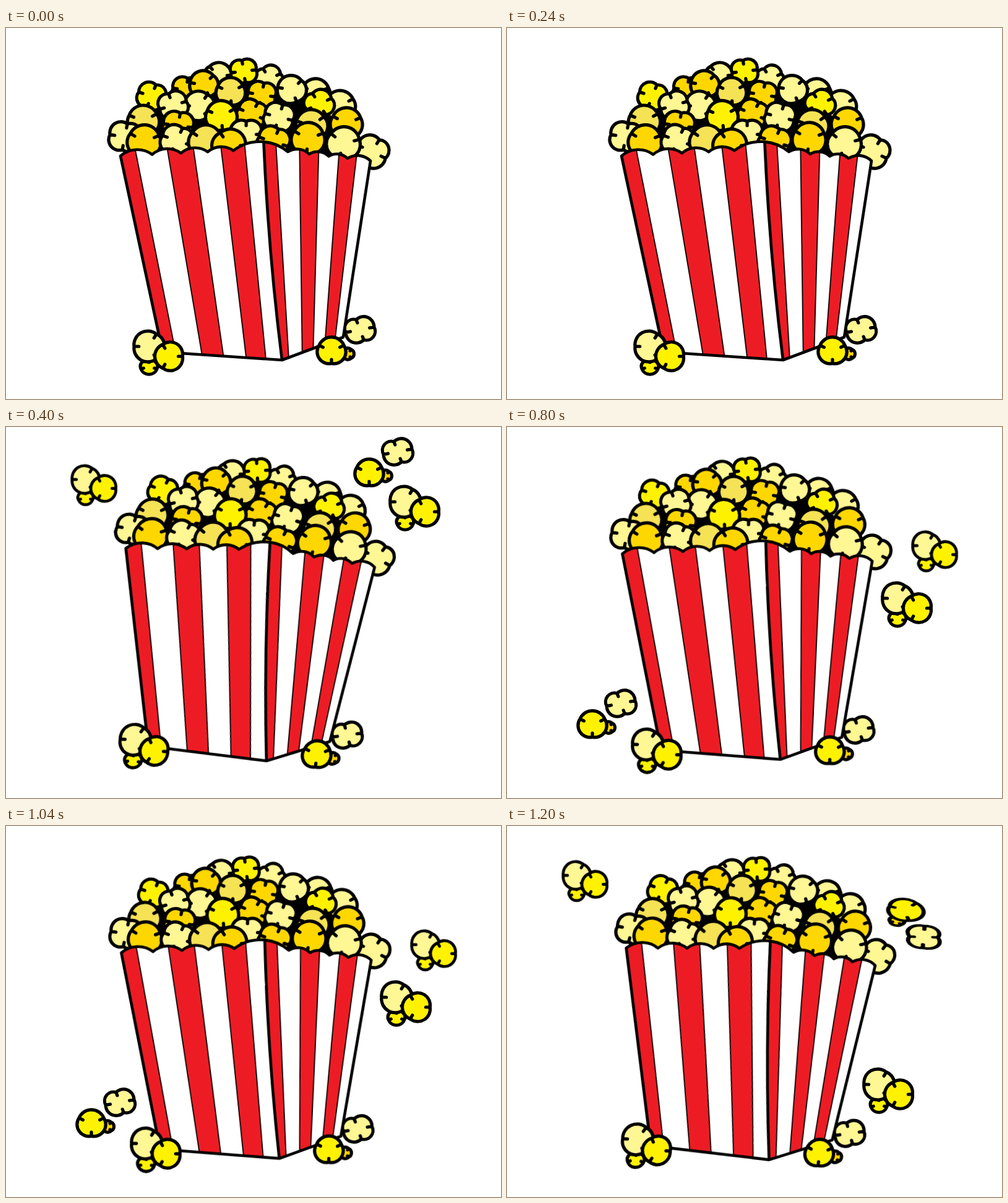
An HTML page that plays this animation: 800x600 px, repeating every 1.6 s.

```html
<!DOCTYPE html>
<html lang="en">
<head>
<meta charset="utf-8">
<title>Popcorn</title>
<style>
  html, body { margin: 0; width: 100%; height: 100%; overflow: hidden; background: #fff; }
  svg { display: block; width: 100%; height: 100%; }
  path { stroke: #000; stroke-linejoin: round; stroke-linecap: round; }
  .puff { stroke-width: 5.2; }
  .stripe { fill: #ed1c24; stroke-width: 1.8; }
  .fold, .rim { fill: none; stroke-width: 4.6; }

  .move { animation: 1.6s step-end infinite; }
  #box { transform-origin: 380px 288px; animation-name: sway; }
  #big, #small { transform-origin: 246px 524px; }
  #big { animation-name: big; }
  #small { animation-name: small; }
  #pair { transform-origin: 552px 505px; animation-name: pair; }

  /* Turns happen in a square picture that is widened to 4:3. */
  @keyframes sway {
    0%, 100% { transform: scale(1.3333, 1) rotate(0deg) scale(.75, 1); }
    25% { transform: scale(1.3333, 1) rotate(4.3deg) scale(.75, 1); }
    50% { transform: scale(1.3333, 1) rotate(.75deg) scale(.75, 1); }
    75% { transform: scale(1.3333, 1) rotate(3.85deg) scale(.75, 1); }
  }
  @keyframes big {
    0%, 100% { visibility: hidden; }
    25% { visibility: visible; transform: translate(414px, -394px); }
    50% { visibility: visible; transform: translate(400px, -238px); }
    75% { visibility: visible; transform: translate(370px, -97px); }
  }
  @keyframes small {
    0%, 100% { visibility: hidden; }
    25% { visibility: visible; transform: translate(-104px, -431px) scale(.9); }
    50% { visibility: visible; transform: translate(445px, -324px) scale(.9); }
    75% { visibility: visible; transform: translate(-120px, -436px) scale(.9); }
  }
  @keyframes pair {
    0%, 100% { visibility: hidden; }
    25% { visibility: visible; transform: translate(61px, -448px); }
    50% { visibility: visible; transform: translate(-388px, -41px); }
    75% { visibility: visible; transform: translate(106px, -345px) scale(1.3333, 1) rotate(108deg) scale(.75, 1); }
  }
</style>
</head>
<body>
<svg viewBox="0 0 800 600" preserveAspectRatio="none">
  <defs>
    <clipPath id="tubClip"><path id="tubShape"/></clipPath>
    <g id="cross"></g>
    <g id="kernel"></g>
    <g id="trio"></g>
  </defs>
  <g id="box" class="move">
    <use href="#cross"/>
    <path d="M200 200 230 115 380 80 545 125 580 205Z"/>
    <g id="pile"></g>
    <g id="tub" clip-path="url(#tubClip)"><path fill="#fff" d="M0 0H800V600H0Z"/></g>
    <g id="rim"></g>
    <use href="#trio"/>
    <use href="#kernel"/>
  </g>
  <g id="big" class="move"><use href="#trio"/></g>
  <g id="small" class="move"><use href="#trio"/></g>
  <g id="pair" class="move"><use href="#cross"/><use href="#kernel"/></g>
</svg>
<script>
const COLORS = { P: '#fff694', G: '#ffd700', B: '#fff200', D: '#f5e255' };
const find = id => document.getElementById(id);
const random = seed => Math.abs(Math.sin(seed * 12.9898) * 43758.5453) % 1;
const mix = (a, b, t) => a + (b - a) * t;
const mixPoint = (p, q, t) => [mix(p[0], q[0], t), mix(p[1], q[1], t)];

function addPath(parent, className, d, fill = '') {
  const path = document.createElementNS('http://www.w3.org/2000/svg', 'path');
  path.setAttribute('class', className);
  path.setAttribute('d', d);
  if (fill) path.setAttribute('fill', fill);
  find(parent).append(path);
}

// Round bulge from p to q; k is its radius in chords.
function bulge(p, q, k) {
  const r = k * Math.hypot(q[0] - p[0], q[1] - p[1]);
  return `A${r} ${r} 0 0 1 ${q}`;
}

// A puffed kernel: equal lobes around an ellipse, with a short crease at each notch.
function puff(parent, color, x, y, rx, ry, lobes, turn) {
  const half = Math.PI / lobes;
  const reach = 1 / (Math.cos(half) + .67 * Math.sin(half));
  const at = (i, depth) => {
    const angle = turn * Math.PI / 180 + 2 * half * i;
    return [x + rx * depth * Math.cos(angle), y + ry * depth * Math.sin(angle)];
  };
  let outline = 'M' + at(0, reach), creases = '';
  for (let i = 0; i < lobes; i++) {
    outline += bulge(at(i, reach), at(i + 1, reach), .54);
    creases += `M${at(i, reach)}L${at(i, reach * .68)}`;
  }
  addPath(parent, 'puff', outline + 'Z' + creases, COLORS[color]);
}

// Pile, back to front: colour and centre; nearer kernels are larger.
const pile = `P342,78 P425,82 P500,106 B384,70
  P540,126 G291,100 G320,92 G413,108 D363,104 B506,123 P462,100 B235,110
  P313,126 P270,125 D222,151 G397,139 B348,143 G278,158 D494,158 P441,144 G550,155
  P192,176 G223,184 P276,182 D322,184 P388,172 G360,190 G432,184 G488,180 P591,200 P545,187`;
pile.split(/\s+/).forEach((kernel, i) => {
  const [x, y] = kernel.slice(1).split(',').map(Number);
  const ry = 18 + y / 25;
  puff('pile', kernel[0], x, y, ry * 1.15, ry, 3 + i % 2, 90 + 60 * (random(i + 1) - .5));
});

// Loose kernels
puff('cross', 'P', 572, 488, 28, 20, 4, -15);
puff('kernel', 'G', 553, 527, 10, 9, 3, 60);
puff('kernel', 'B', 526, 523, 25, 21, 3, 90);
puff('trio', 'B', 231, 547, 16, 10, 3, 30);
puff('trio', 'P', 231, 515, 26, 25, 3, 180);
puff('trio', 'B', 264, 531, 23, 24, 3, 0);

// Tub: both faces share the same band edges, as shares of their width.
const CUTS = [0, .11, .33, .51, .70, .865];
const left = { top: [[185, 207], [418, 196]], bottom: [[253, 524], [446, 537]] };
const right = { top: [[418, 196], [589, 215]], bottom: [[446, 537], [545, 500]] };
const edge = (face, u) => {
  const low = mixPoint(...face.bottom, u);
  return [mixPoint(mixPoint(...face.top, u), low, -.08), low];
};

for (const face of [left, right]) {
  for (let i = 0; i < CUTS.length; i += 2) {
    const [a, d] = edge(face, CUTS[i]), [b, c] = edge(face, CUTS[i + 1]);
    const [midX, midY] = mixPoint(a, d, .5);
    const bow = face === right && i === 0 ? 8 : 0;
    const side = `M${a}Q${midX - bow} ${midY} ${d}`;
    addPath('tub', 'stripe', `${side}L${c}L${b}Z`);
    if (bow) addPath('tub', 'fold', side);
  }
}

// The rim dips in the middle of every inner band.
const dips = face => CUTS.slice(1, -1).map((u, i) => mixPoint(...face.top, (u + CUTS[i + 2]) / 2));
const rim = [left.top[0], ...dips(left), ...dips(right), right.top[1]];
const tub = 'M' + rim[0] + rim.slice(1).map((p, i) => bulge(rim[i], p, .8)).join('') +
  [right.bottom[1], ...left.bottom.slice().reverse()].map(p => 'L' + p).join('') + 'Z';
find('tubShape').setAttribute('d', tub);
addPath('rim', 'rim', tub);
</script>
</body>
</html>
```
